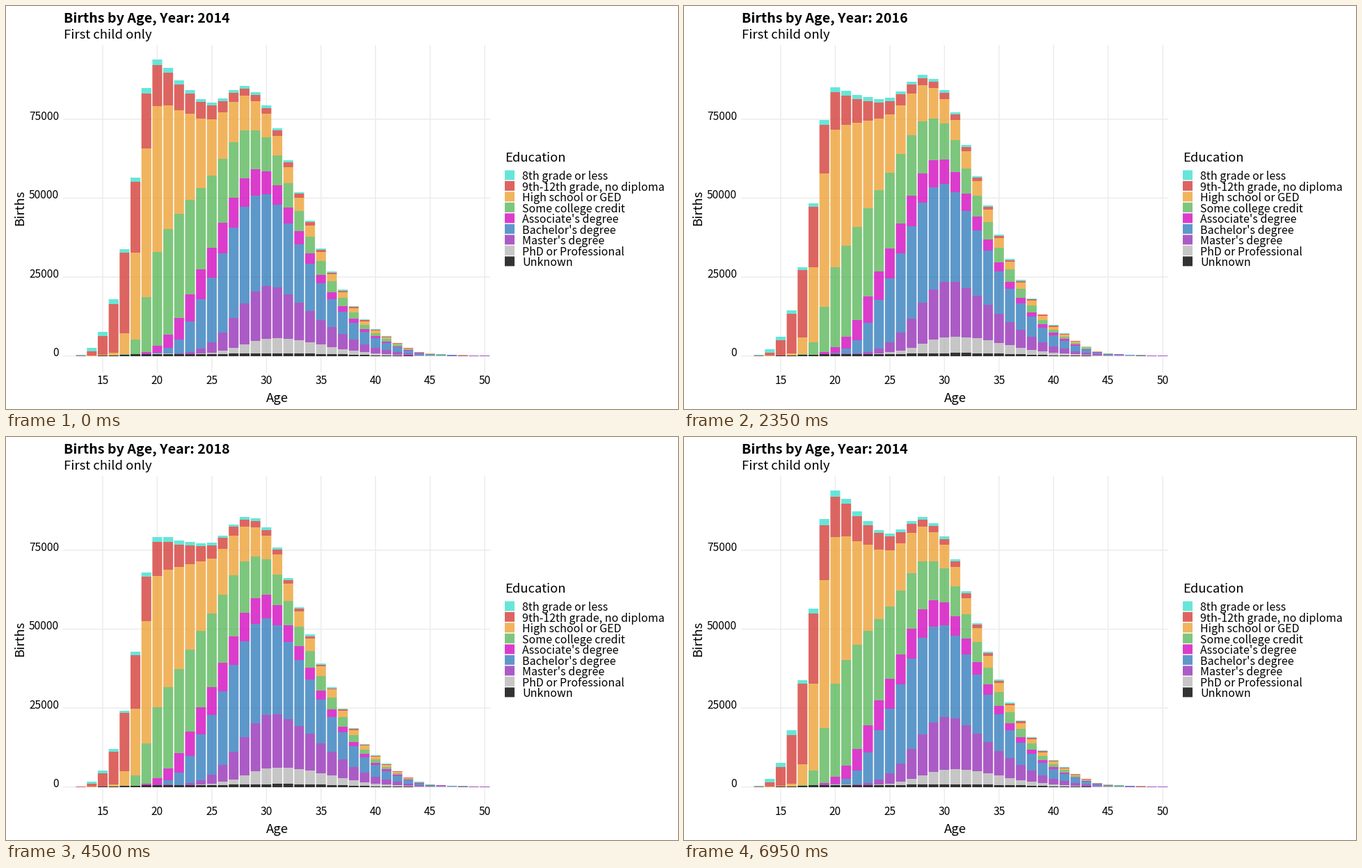
Recreate the animation shown at these times as a matplotlib script. Size 966x580 px, loop 7000 ms.

```python
import numpy as np
import matplotlib.pyplot as plt
from matplotlib.animation import FuncAnimation
from matplotlib.collections import PolyCollection
from matplotlib.patches import Rectangle

W, H, DPI = 966, 580, 100
FRAMES, INTERVAL = 140, 50
FONT = "Noto Sans CJK JP"

# Plot geometry in stage pixels
AGES = np.arange(13, 51)
BASE = 503.7
AGE_STEP = 15.69
STEP_25K = 113.6
BAR_W = 0.9 * AGE_STEP

# Each year rests for HOLD frames, then turns into the next one
FIRST_YEAR = 2014
HOLD = 12
STEPS = [12, 12, 12, 11, 11, 11]
STARTS = np.cumsum([HOLD] + [HOLD + n for n in STEPS[:-1]])

# Per year: progress of the long-term trend, and a passing rise after age 25
PACE = [0, .21, .5, .72, .87, 1]
BOOM = [0, .025, .05, .023, .016, 0]


def age_x(age):
    return 139 + AGE_STEP * (age - 15)


def smooth(points):
    """Monotone cubic curve through {age: value}, sampled at AGES."""
    x, y = np.array(list(points.items()), float).T
    h = np.diff(x)
    slope = np.diff(y) / h
    a, b = slope[:-1], slope[1:]
    m = np.zeros(len(x))
    np.divide(2 * a * b, a + b, out=m[1:-1], where=a * b > 0)
    age = np.clip(AGES, x[0], x[-1])
    i = np.clip(np.searchsorted(x, age, "right") - 1, 0, len(h) - 1)
    t = (age - x[i]) / h[i]
    s = t * t * (3 - 2 * t)
    bend = t * (1 - t) * ((1 - t) * m[i] - t * m[i + 1])
    return y[i] + s * (y[i + 1] - y[i]) + h[i] * bend


# Bar heights of the first year, and their relative change until the last
first_total = smooth({13: 1.5, 15: 34.5, 17: 153.5, 18: 257, 19: 385.5,
                      20: 426.5, 22: 396.5, 25: 364.5, 28: 388.5, 30: 360.5,
                      33: 236, 36: 121.5, 40: 38.5, 45: 3.5, 50: .8})
trend = np.interp(AGES, [16, 20, 24, 28, 32, 36],
                  [-.387, -.186, -.077, -.019, .0625, .197])
boom_ages = np.interp(AGES, [21, 25], [0, 1])
late_ages = np.interp(AGES, [28, 34], [0, 1])

labels, colors, shares, drifts = [], [], [], []


def layer(label, color, points, dip=0, dip_age=0, late=0):
    """Stack a layer whose top edge is a share of the bar. Over the years
    the share dips around dip_age and rises for late mothers."""
    labels.append(label)
    colors.append(color)
    shares.append(smooth(points))
    drifts.append(late * late_ages
                  - dip * np.exp(-((AGES - dip_age) / 2.5) ** 2))


layer("Unknown", "#000000", {16: .012, 20: .007, 28: .009, 40: .026})
layer("PhD or Professional", "#B8B8B8",
      {23: .008, 26: .02, 30: .069, 36: .107, 40: .104}, late=.008)
layer("Master's degree", "#9632B8",
      {22: .009, 24: .0285, 26: .092, 28: .196, 30: .279, 33: .326, 36: .34,
       40: .312}, dip=.013, dip_age=28, late=.018)
layer("Bachelor's degree", "#357EBD",
      {19: .008, 20: .011, 22: .06, 24: .2215, 28: .553, 30: .645, 33: .683,
       40: .665}, dip=.023, dip_age=26.5, late=.03)
layer("Associate's degree", "#D30BC0",
      {18: .008, 20: .034, 22: .1375, 24: .336, 28: .659, 30: .7365,
       33: .762, 40: .74}, dip=.028, dip_age=26.3, late=.026)
layer("Some college credit", "#5CB85C",
      {16: .01, 17: .02, 18: .093, 20: .35, 22: .517, 26: .764, 28: .835,
       31: .881, 36: .885, 40: .857}, dip=.05, dip_age=21.3, late=.012)
layer("High school or GED", "#EEA236",
      {15: .04, 16: .06, 17: .21, 18: .578, 19: .774, 20: .843, 24: .924,
       29: .966, 36: .967, 40: .948}, late=.01)
layer("9th-12th grade, no diploma", "#D43F3A",
      {13: .33, 15: .826, 17: .967, 20: .981, 28: .99, 40: .987})
layer("8th grade or less", "#40E0D0", {13: 1, 50: 1})


def stack(pace, boom):
    """Layer edges of one year, from the baseline up."""
    total = first_total * (1 + pace * trend + boom * boom_ages)
    share = np.clip(np.array(shares) + pace * np.array(drifts), 0, 1)
    share = np.maximum.accumulate(share, axis=0)
    return np.vstack([np.zeros(len(AGES)), share * total])


states = [stack(pace, boom) for pace, boom in zip(PACE, BOOM)]


def ease(p):
    return 4 * p ** 3 if p < .5 else 1 - 4 * (1 - p) ** 3


def pose(frame):
    """Layer edges and the year shown in the title."""
    i = np.searchsorted(STARTS, frame, "right") - 1
    if i < 0:
        return states[0], FIRST_YEAR
    j = (i + 1) % len(states)
    p = min(1, (frame - STARTS[i] + 1) / STEPS[i])
    e = ease(p)
    return (1 - e) * states[i] + e * states[j], FIRST_YEAR + (i if p < .5 else j)


fig = plt.figure(figsize=(W / 100, H / 100), dpi=DPI, facecolor="white")
ax = fig.add_axes([0, 0, 1, 1])
ax.set(xlim=(0, W), ylim=(H, 0))
ax.axis("off")


def text(x, y, s, px, **kw):
    kw.setdefault("va", "baseline")
    return ax.text(x, y, s, fontsize=px * 72 / DPI, family=FONT,
                   color="black", **kw)


# Grid and axes
grid = dict(colors="#EBEBEB", linewidth=1.4 * 72 / DPI, snap=False, zorder=1)
for k in range(4):
    y = BASE - k * STEP_25K
    ax.hlines(y, 82, 696, **grid)
    text(76, y + .8, str(k * 25000), 15.6, ha="right")
for age in range(15, 51, 5):
    ax.vlines(age_x(age), 56, 528, **grid)
    text(age_x(age), 544.5, str(age), 15.6, ha="center")
text(390, 569.5, "Age", 18.5, ha="center")
text(29, 290.5, "Births", 18.5, rotation=90, ha="right", va="center")

title = text(83, 24, "", 19.65, weight="bold")
text(83, 47, "First child only", 18.5)

# Legend
text(717, 224, "Education", 18.4)
for k, (label, color) in enumerate(zip(labels[::-1], colors[::-1])):
    y = 236.4 + 15.5 * k
    ax.add_patch(Rectangle((717, y), 14, 14, fc=color, alpha=.8, lw=0,
                           snap=False))
    text(742, y + 13.9, label, 16)

# Bars
layers = [PolyCollection([], facecolors=c, edgecolors="none", linewidths=0,
                         alpha=.8, snap=False, zorder=2) for c in colors]
for coll in layers:
    ax.add_collection(coll, autolim=False)

left = age_x(AGES) - BAR_W / 2
right = left + BAR_W


def draw(frame):
    edges, year = pose(frame)
    y = np.round(BASE - edges)  # whole pixels keep the seams clean
    for coll, low, high in zip(layers, y[:-1], y[1:]):
        xs = np.stack([left, right, right, left], axis=1)
        ys = np.stack([low, low, high, high], axis=1)
        coll.set_verts(np.stack([xs, ys], axis=2))
    title.set_text(f"Births by Age, Year: {year}")
    return [*layers, title]


anim = FuncAnimation(fig, draw, frames=FRAMES, interval=INTERVAL,
                     init_func=lambda: draw(0), repeat=True, repeat_delay=0)
plt.show()
```
